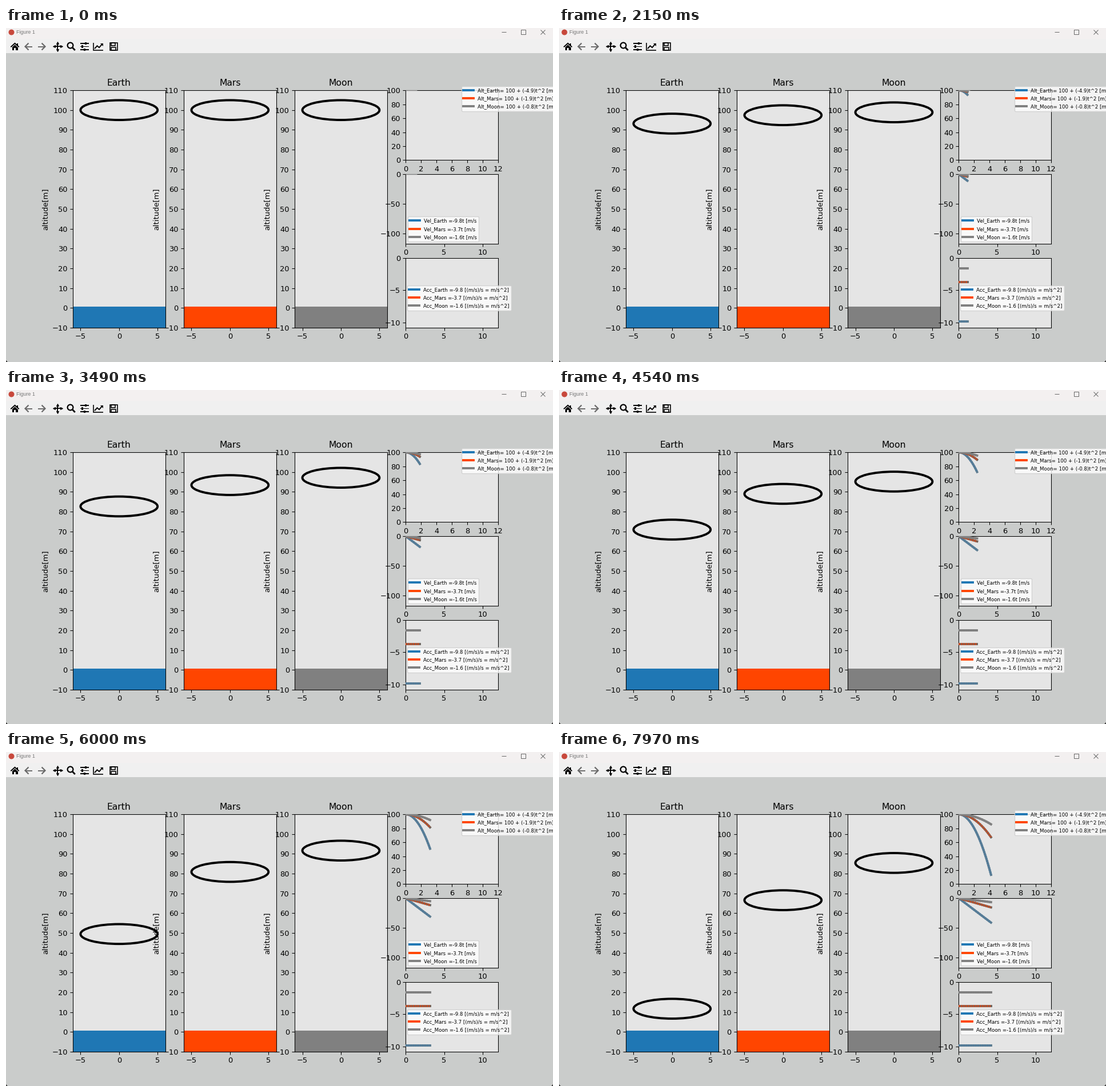
Recreate the animation shown at these times as a matplotlib script. Size 957 by 585 pixels, loop 8 s.

```python
import numpy as np
import matplotlib.pyplot as plt
from matplotlib.animation import FuncAnimation
from matplotlib.lines import Line2D
from matplotlib.patches import Ellipse, Polygon, Rectangle

W, H, DPI = 957, 585, 100
PX = 72 / DPI          # one pixel in points
K = 0.94               # scale of the figure's default sizes
STEPS, LOOP = 116, 8000
STALL = 87             # step at which the clock skips a beat
DT = 0.0369            # simulated seconds per step
THICK = 3 * K

plt.rcParams.update({
    "font.family": "DejaVu Sans",
    "font.size": 10 * K,
    "axes.titlesize": 12 * K,
    "axes.titlepad": 6 * K,
    "axes.labelpad": 4 * K,
    "axes.linewidth": 0.8 * K,
})
for side in "xy":
    plt.rcParams.update({
        f"{side}tick.major.size": 3.5 * K,
        f"{side}tick.major.width": 0.8 * K,
        f"{side}tick.major.pad": 3.5 * K,
    })

# name, gravity, colour, trail base, trail dashes
BODIES = [
    ("Earth", 9.8, "#1f77b4", "#5f7d90", "#527c9b"),
    ("Mars", 3.71, "#ff4500", "#6a655f", "#c44d26"),
    ("Moon", 1.62, "#808080", "#808080", "#808080"),
]

fig = plt.figure(figsize=(W / DPI, H / DPI), dpi=DPI, facecolor="#cacccb")


# ---- window frame and toolbar ----
win = fig.add_axes([0, 0, 1, 1], zorder=-1)
win.set(xlim=(0, W), ylim=(H, 0))
win.axis("off")
GREY = "#696969"


def box(cx, cy, w, h, fill="black", edge="none", lw=1.6):
    win.add_patch(Rectangle((cx - w / 2, cy - h / 2), w, h, facecolor=fill,
                            edgecolor=edge, linewidth=lw * PX))


def poly(*pts, color="black"):
    win.add_patch(Polygon(pts, facecolor=color, edgecolor="none"))


def stroke(*pts, lw=1.9, color="black"):
    win.plot(*zip(*pts), color=color, linewidth=lw * PX,
             solid_capstyle="butt", solid_joinstyle="miter")


def mark(x, y, shape, size, color="black", lw=1.0, fill="none"):
    win.plot(x, y, marker=shape, markersize=size * PX, markeredgecolor=color,
             markerfacecolor=fill, markeredgewidth=lw * PX)


def title_bar():
    box(W / 2, 9.5, W, 19, "#f3f0f0")
    box(W / 2, 31.5, W, 25, "#f0f0f0")
    mark(8.5, 7, "o", 9, "#c8483c", fill="#c8483c")
    win.text(18.5, 10, "Figure 1", family="Liberation Sans",
             fontsize=8.9 * PX, color="#777777")
    for i, shape in enumerate("_sx"):
        mark(871 + 34.2 * i, 7, shape, 7.5, GREY)


def home(x, y):
    stroke((x - 7.2, y + 0.8), (x, y - 5.7), (x + 7.2, y + 0.8))
    box(x + 4.5, y - 3.5, 2, 4)
    poly((x - 5, y + 1.4), (x, y - 3.1), (x + 5, y + 1.4))
    for d in (-1, 1):
        box(x + 3.2 * d, y + 4, 3.6, 5.6)
    box(x, y + 1.9, 9, 1.4)


def arrow(x, y, d):
    stroke((x + 6.5 * d, y), (x - 5.5 * d, y), color=GREY)
    stroke((x, y - 6), (x - 6 * d, y), (x, y + 6), lw=2.2, color=GREY)


def pan(x, y):
    mark(x, y, "+", 13, lw=1.9)
    for shape, ux, uy in (("^", 0, -1), ("v", 0, 1), ("<", -1, 0), (">", 1, 0)):
        mark(x + 6.4 * ux, y + 6.4 * uy, shape, 4, fill="black")


def zoom(x, y):
    mark(x - 1.5, y - 2, "o", 9.8, lw=2.2)
    stroke((x + 2, y + 1.5), (x + 7, y + 6.7), lw=2.8)


def sliders(x, y):
    for row, knob in ((-1, 2.5), (0, -3.5), (1, 0.5)):
        box(x, y + 5.5 * row, 15, 1.6)
        box(x + knob, y + 5.5 * row, 3.2, 4.8)


def chart(x, y):
    stroke((x - 8, y - 7), (x - 8, y + 6.5), (x + 8.5, y + 6.5), lw=1.6)
    stroke((x - 6, y + 3.7), (x - 1.5, y - 1.3), (x + 2, y + 1.7), (x + 7, y - 4))
    poly((x + 3.8, y - 5.7), (x + 8.5, y - 5.7), (x + 8.5, y - 1))


def save(x, y):
    box(x, y, 13, 13, "none", "black")
    box(x - 1, y - 4, 6.4, 4.5, "none", "black")
    box(x, y + 4, 8, 5, "none", "black")


title_bar()
home(15.5, 32.5)
arrow(39.5, 32.5, 1)
arrow(62.5, 32.5, -1)
pan(90.3, 32.3)
zoom(113.8, 32.3)
sliders(137, 32.5)
chart(161, 32.5)
save(188.3, 32.3)
for x, d in ((0, 1), (W, -1)):
    poly((x, H - 3), (x, H), (x + 3 * d, H), color="#333333")


# ---- plots ----
grid = fig.add_gridspec(3, 4, left=116.9 / W, right=860.9 / W,
                        bottom=1 - 525.1 / H, top=1 - 109.1 / H,
                        wspace=0.2, hspace=0.2)


def add_plot(cell, xlim, ylim, xstep, ystep):
    ax = fig.add_subplot(cell, facecolor="#e5e5e5")
    ax.xaxis.set_major_locator(plt.MultipleLocator(xstep))
    ax.yaxis.set_major_locator(plt.MultipleLocator(ystep))
    ax.set(xlim=xlim, ylim=ylim)
    return ax


balls = []
for col, (name, g, color, *_) in enumerate(BODIES):
    ax = add_plot(grid[:, col], (-6, 6), (-10, 110), 5, 10)
    ax.set_title(name)
    ax.set_ylabel("altitude[m]")
    ax.add_patch(Rectangle((-6, -10), 12, 10.6, facecolor=color,
                           edgecolor="none"))
    ball = Ellipse((0, 100), 10, 10, facecolor="none", edgecolor="black",
                   linewidth=THICK, zorder=4)
    balls.append(ax.add_patch(ball))

LAWS = [
    lambda g, t: 100 - g / 2 * t ** 2,
    lambda g, t: -g * t,
    lambda g, t: -g + 0 * t,
]
charts = [
    add_plot(grid[0, 3], (0, 12), (0, 100), 2, 20),
    add_plot(grid[1, 3], (0, 12), (-9.8 * 12, 0), 5, 50),
    add_plot(grid[2, 3], (0, 12), (-10.8, 0), 5, 5),
]

# grey remnant on the top edge of two charts
for ax in charts[:2]:
    top = ax.get_ylim()[1]
    ax.plot([0, 1.5], [top, top], color="#808080", linewidth=0.9,
            solid_capstyle="butt", clip_on=False, zorder=3)

trails = []
for ax, law in zip(charts, LAWS):
    for _, g, _, base, dashes in BODIES:
        for color, style in ((base, "-"), (dashes, (0, (0.7, 0.35)))):
            line, = ax.plot([], [], color=color, linewidth=THICK,
                            linestyle=style, zorder=4)
            trails.append((line, law, g))


def add_legend(ax, x, y, pattern, scale=1.0):
    handles = [Line2D([], [], color=color, linewidth=THICK,
                      label=pattern.format(name, g * scale))
               for name, g, color, *_ in BODIES]
    ax.legend(handles=handles, loc="upper left", borderaxespad=0,
              labelspacing=0.6, bbox_to_anchor=(x / W, 1 - y / H),
              bbox_transform=fig.transFigure, fontsize=8.7 * PX)


add_legend(charts[0], 797, 101.6, "Alt_{}= 100 + (-{:.1f})t^2 [m]", 0.5)
add_legend(charts[1], 703, 330, "Vel_{} =-{:.1f}t [m/s")
add_legend(charts[2], 702, 450.5, "Acc_{} =-{:.1f} [(m/s)/s = m/s^2]")


def update(k):
    n = k - k // STALL
    t = DT * np.arange(n + 1)
    now = DT * (n + 1)
    for ball, body in zip(balls, BODIES):
        ball.set_center((0, LAWS[0](body[1], now)))
    for line, law, g in trails:
        # a single point would still leave a cap
        line.set_data((t, law(g, t)) if n else ([], []))
    return balls + [trail[0] for trail in trails]


anim = FuncAnimation(fig, update, frames=STEPS, interval=LOOP / STEPS,
                     init_func=lambda: update(0), repeat=True,
                     repeat_delay=0, blit=False)
plt.show()
```
